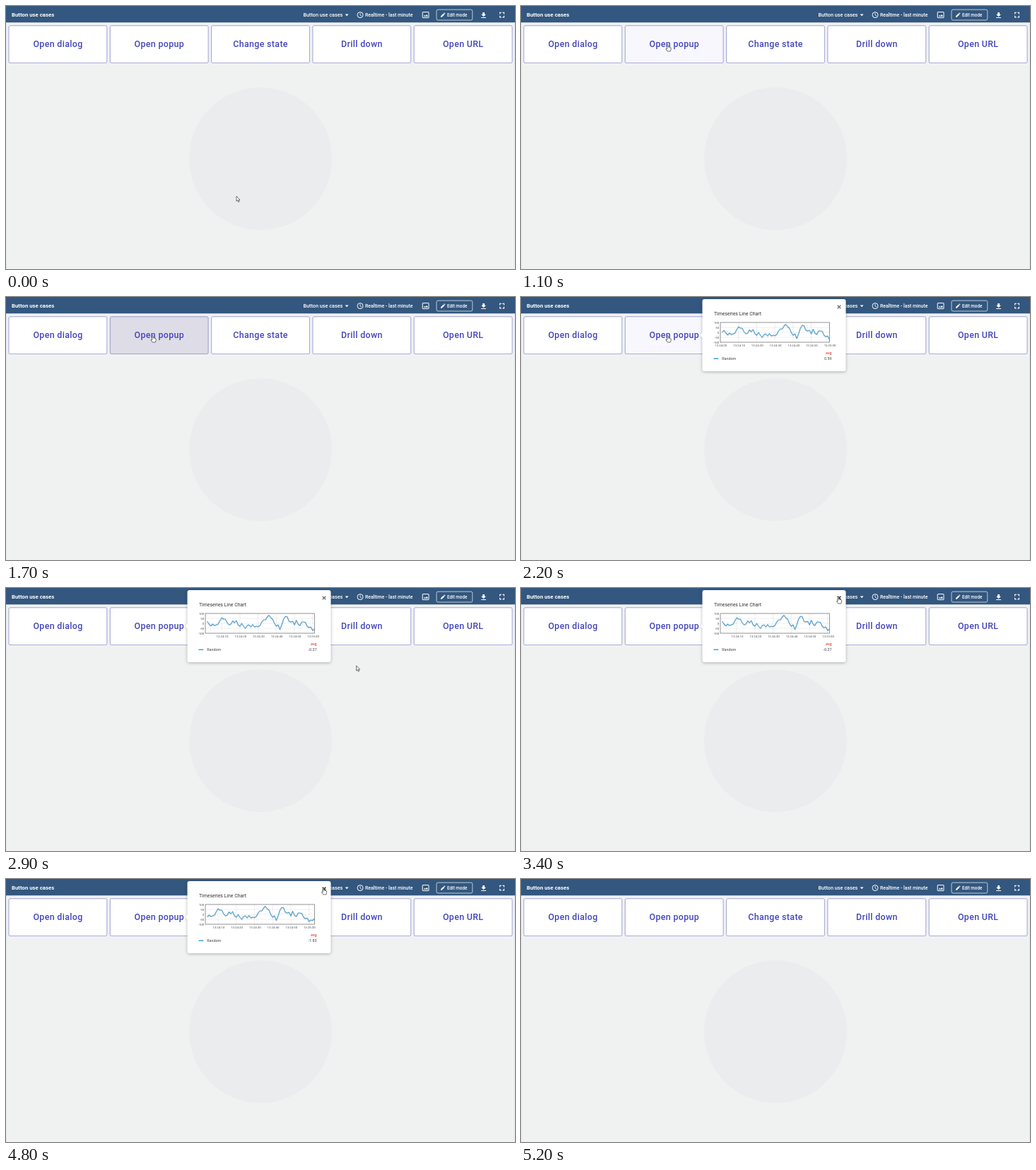
Write an HTML page that moves like this. It is 720 px wide and 372 px high and loops after 5800 ms.

```html
<!DOCTYPE html>
<html lang="en">
<head>
<meta charset="utf-8">
<title>Button use cases</title>
<style>
  html, body { margin: 0; width: 100%; height: 100%; overflow: hidden; background: #f0f2f2; }
  svg { display: block; width: 100vw; height: 100vh; font-family: Roboto, sans-serif; }
  .label { font-size: 12.4px; font-weight: 500; letter-spacing: .35px; fill: #4446bb; text-anchor: middle; }
  .card { stroke: #8486cf; stroke-width: .7; filter: drop-shadow(0 .6px .6px rgba(60, 60, 120, .14)); }
  .panel { fill: #fff; filter: drop-shadow(0 1px 2.2px rgba(0, 0, 0, .28)); }
  .header { fill: #fff; font-weight: 500; }
  .line { fill: none; stroke: #fff; }
  .axis { font-size: 4.4px; fill: #555; }
  .end { text-anchor: end; }
  .middle { text-anchor: middle; }
</style>
</head>
<body>
<svg viewBox="0 0 720 372" preserveAspectRatio="none">
  <defs>
    <clipPath id="buttonClip"><rect x="147.3" y="27.8" width="138.8" height="52.8" rx="2"/></clipPath>
    <clipPath id="plotClip"><rect x="282" y="36" width="154.5" height="28"/></clipPath>
  </defs>
  <rect width="720" height="372" fill="#f0f2f2"/>
  <path d="M.5 23V372M719.5 23V372" stroke="#e2e6ea"/>
  <circle cx="360" cy="216" r="101" fill="#eaecee"/>

  <rect width="720" height="23.3" fill="#33577f"/>
  <g class="header">
    <text x="8" y="15.2" font-size="7.8" font-weight="600">Button use cases</text>
    <text x="420.5" y="15" font-size="7.25">Button use cases</text>
    <path d="M479.6 11.6h5l-2.5 2.6z"/>
    <text x="508" y="15" font-size="6.9">Realtime - last minute</text>
    <text x="624" y="14.7" font-size="6.3">Edit mode</text>
    <path d="M615 15.8v-1.5l3.9-3.9 1.5 1.5-3.9 3.9zM619.3 10l.7-.7 1.5 1.5-.7.7z"/>
    <path d="M674.2 9h2.8v2.8h2l-3.4 3.4-3.4-3.4h2zM672.2 15.9h6.8v1h-6.8z"/>
    <path d="M590.7 14.8l1.6-2 1.2 1.4 1.6-2.1 2 2.7z"/>
  </g>
  <g class="line">
    <circle cx="501" cy="12.6" r="4" stroke-width="1"/>
    <path d="M501 10v2.9l2 1.2" stroke-width=".8"/>
    <rect x="589.2" y="8.6" width="8.8" height="8" rx=".4" stroke-width="1"/>
    <rect x="609" y="5.1" width="50.8" height="14.9" rx="2" stroke-width=".8" stroke="#dfe6ee"/>
    <path d="M698.6 11.5V9.4h2.1M702.4 9.4h2.1v2.1M704.5 13.8v2.1h-2.1M700.7 15.9h-2.1v-2.1" stroke-width="1.1"/>
  </g>

  <g id="cards"></g>
  <circle id="ripple" cx="207.5" cy="54" fill="#000030" clip-path="url(#buttonClip)"/>
  <g id="labels"></g>

  <g id="popup">
    <path class="panel" d="M259.5 3h197a3 3 0 0 1 3 3v96a3 3 0 0 1-3 3h-197a3 3 0 0 1-3-3V57.5L253.2 54l3.3-3.5V6a3 3 0 0 1 3-3z"/>
    <path id="close" d="M447.7 11.7l4.6 4.6M452.3 11.7l-4.6 4.6" stroke-width="1.5"/>
    <text x="273" y="25.5" font-size="6.9" fill="#333">Timeseries Line Chart</text>
    <g id="chart">
      <path id="grid" stroke="#ddd" stroke-width=".5" clip-path="url(#plotClip)"/>
      <g id="yLabels" class="axis end"></g>
      <g id="xLabels" class="axis middle"></g>
      <g fill="none" stroke-linejoin="round" clip-path="url(#plotClip)">
        <path class="series" transform="translate(.3 .9)" stroke="#000" stroke-opacity=".12" stroke-width="1.4"/>
        <path class="series" stroke="#4a9fd3" stroke-width="1.05"/>
      </g>
      <rect x="282" y="36" width="154.3" height="28" fill="none" stroke="#666" stroke-width=".7"/>
      <path d="M272.5 87.2h6.8" stroke="#2f9ad6" stroke-width="1.4"/>
      <text x="284.2" y="89.1" font-size="5.4" fill="#444">Random</text>
      <text class="end" x="439.5" y="80.7" font-size="5.3" font-weight="500" fill="#e5453a">avg</text>
      <text class="end" id="average" x="439.5" y="89.1" font-size="5.4" fill="#444"></text>
    </g>
  </g>

  <g id="cursor" stroke="#333" stroke-width=".7" stroke-linejoin="round" fill="#fff">
    <path id="arrow" d="M0 0V7.2L1.7 5.7 2.8 8.2 4 7.7 2.9 5.3H5z"/>
    <path id="hand" d="M-.8.8Q0-.5.8.8V3.6Q1.7 3 2.2 3.9 3.1 3.4 3.5 4.3 4.6 4 4.6 5.2V7.3L3.7 9.5H-.3L-2.5 6.2Q-2.5 4.9-.8 6.2z"/>
  </g>
</svg>
<script>
const LOOP = 5800, STEP = 100;
const PLOT = { left: 282, top: 36, width: 154.3, height: 28 };
const SECOND = PLOT.width / 60;
const $ = id => document.getElementById(id);
const clamp = v => Math.max(0, Math.min(1, v));
const ramp = (t, from, to) => clamp((t - from) / (to - from));
const smooth = p => p * p * (3 - 2 * p);
const show = (id, visible) => { $(id).style.display = visible ? '' : 'none'; };
const text = (x, y, label, cls = '') => `<text x="${x}" y="${y}" class="${cls}">${label}</text>`;

const names = ['Open dialog', 'Open popup', 'Change state', 'Drill down', 'Open URL'];
const buttonX = i => 4 + i * 143.3;
$('cards').innerHTML = names.map((_, i) =>
  `<rect class="card" x="${buttonX(i)}" y="27.8" width="138.8" height="52.8" rx="2" fill="#fff"/>`).join('');
$('labels').innerHTML = names.map((name, i) => text(buttonX(i) + 69.5, 58.1, name, 'label')).join('');
const popupButton = $('cards').children[1];

$('yLabels').innerHTML = [100, 50, 0, -50, -100].map((v, i) => text(280.3, 37.6 + i * 7, v)).join('');

// One sample per second, in pixels below the plot's top edge.
const samples = [
  14, 11, 15, 17.5, 15, 17, 16, 15, 10, 6, 8, 8, 13, 16, 15, 10.5, 13, 10, 16, 18,
  14, 18, 21, 17, 16, 19, 15.5, 19, 18, 18.5, 17, 12, 9, 9, 5, 2.5, 6, 8, 14, 18,
  16, 22.5, 16, 8, 4, 4.5, 11, 12, 11, 16, 9.5, 15, 17, 12, 12, 12.5, 18, 20, 19, 24,
  22, 22.5, 20
];
const averages = ['0.59', '-0.27', '-1.56', '-1.83'];

function drawChart(shift) {
  const ticks = [0, 10, 20, 30, 40, 50, 60].filter(s => s >= shift);
  const tickX = s => PLOT.left + (s - shift) * SECOND;
  $('xLabels').innerHTML = ticks.map(s =>
    text(tickX(s) + .8, 70, s < 60 ? `13:24:${String(s).padStart(2, '0')}` : '13:25:00')).join('');
  const rows = [1, 2, 3].map(i => `M${PLOT.left} ${PLOT.top + i * 7}h${PLOT.width}`);
  const columns = ticks.map(s => `M${tickX(s)} ${PLOT.top}v${PLOT.height}`);
  $('grid').setAttribute('d', rows.concat(columns).join(''));
  const points = samples.slice(shift, shift + 60)
    .map((y, i) => `${PLOT.left + (i + 1) * SECOND} ${PLOT.top + y}`);
  document.querySelectorAll('.series').forEach(p => p.setAttribute('d', 'M' + points.join('L')));
  $('average').textContent = averages[shift];
}

// Each leg is an eased quadratic curve: start time, end time, start, control, end.
const legs = [
  [300, 900, [326, 269], [266, 160], [207.5, 54.5]],
  [2200, 2700, [207.5, 54.5], [320, 150], [480, 158]],
  [2700, 3160, [480, 158], [523, 107], [449, 12.5]]
];
function cursorAt(t) {
  const [from, to, a, b, c] = legs.findLast(leg => t >= leg[0]) || legs[0];
  const p = smooth(ramp(t, from, to)), q = 1 - p;
  return [0, 1].map(k => q * q * a[k] + 2 * p * q * b[k] + p * p * c[k]);
}

let drawnShift = -1;
function render(time) {
  const t = Math.floor(time % LOOP / STEP) * STEP;

  const [x, y] = cursorAt(t);
  const onButton = x > 147 && x < 286 && y > 28 && y < 81;
  const onClose = x > 445 && x < 454 && y < 18;
  $('cursor').setAttribute('transform', `translate(${x} ${y})`);
  show('cursor', t < 5200);
  show('hand', onButton || onClose);
  show('arrow', !onButton && !onClose);
  popupButton.setAttribute('fill', onButton ? '#f8f7fe' : '#fff');

  $('ripple').setAttribute('r', t < 1400 ? 0 : t < 1500 ? 55 : 100);
  $('ripple').setAttribute('opacity', .165 * (1 - ramp(t, 1600, 1900)));

  const shown = smooth(ramp(t, 1700, 1900)) * (1 - smooth(ramp(t, 5000, 5200)));
  const scale = .8 + .2 * shown;
  show('popup', shown > 0);
  $('popup').setAttribute('opacity', shown);
  $('popup').setAttribute('transform', `translate(253 54) scale(${scale}) translate(-253 -54)`);
  show('chart', t >= 2000);
  $('close').setAttribute('stroke', onClose ? '#222' : '#757575');

  // The chart scrolls by one sample each second.
  const shift = Math.max(0, Math.min(3, Math.floor((t - 1800) / 1000)));
  if (shift !== drawnShift) drawChart(drawnShift = shift);
}

const start = performance.now();
function tick() {
  render(performance.now() - start);
  requestAnimationFrame(tick);
}
tick();
</script>
</body>
</html>
```
